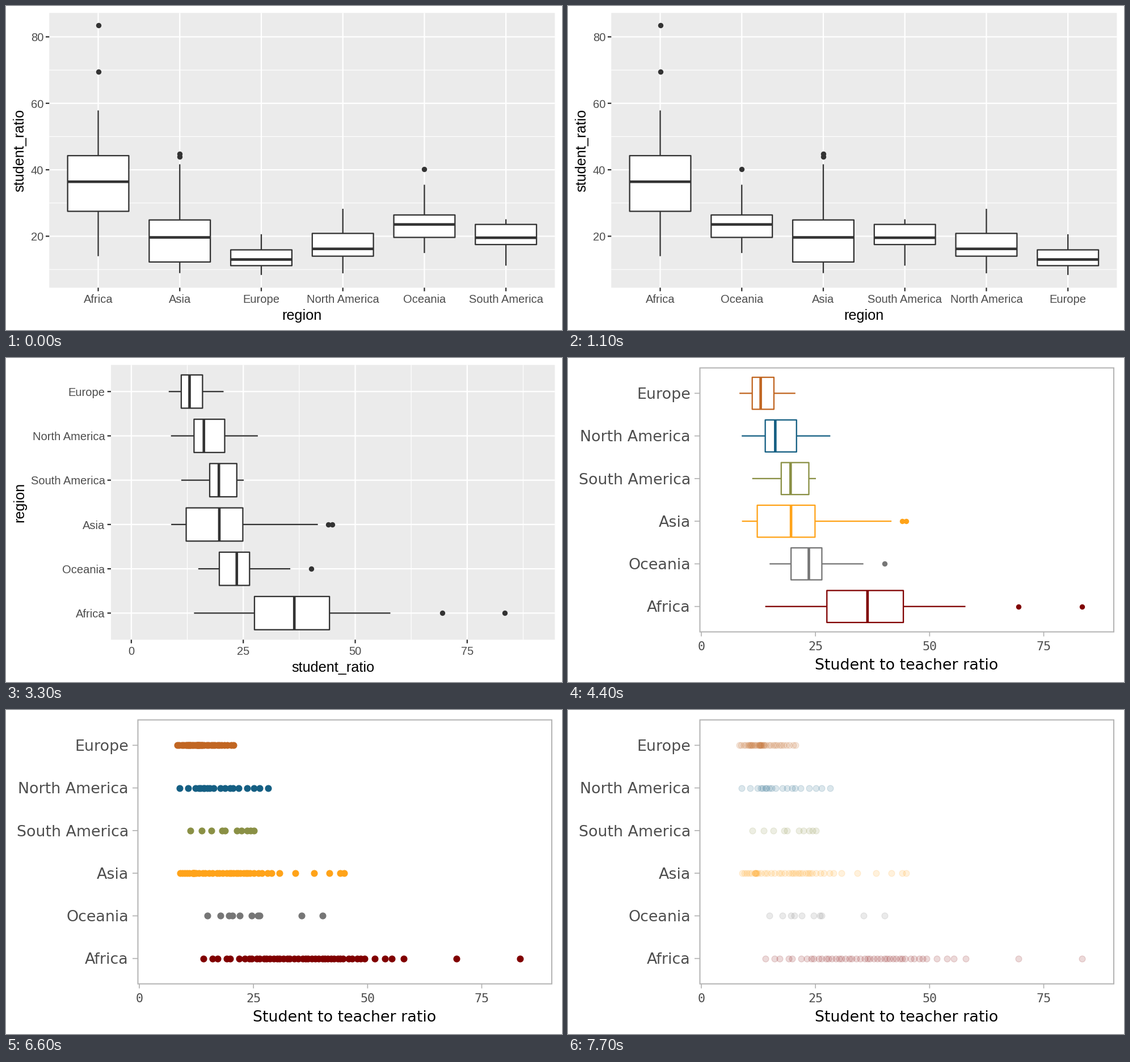
Recreate the animation shown at these times as a matplotlib script. Size 980x572 px, loop 8000 ms.

```python
import numpy as np
import matplotlib.pyplot as plt
from matplotlib.animation import FuncAnimation
from matplotlib.patches import Polygon, Rectangle

W, H, DPI = 980, 572, 100
PX = 72 / DPI            # points per pixel
STEP, LOOP, HOLD = 100, 8000, 1100
DARK, TEXT, PANEL, RULE = "#333333", "#4D4D4D", "#EBEBEB", "#B3B3B3"
plt.rcParams["path.snap"] = False
rng = np.random.default_rng(4)


class Region:
    """Octiles (the last one is the whisker end), outliers and country count."""

    def __init__(self, color, count, octiles, outliers=()):
        self.color, self.outliers = color, outliers
        self.box = octiles[::2]
        body = count - len(outliers)
        end = (body - 1) / (count - 1)
        rank = np.linspace(0, end, body)
        rank[1:-1] += rng.uniform(-0.3, 0.3, body - 2) / (count - 1)
        knots = np.append(np.arange(8) / 8, end)
        self.values = np.append(np.interp(rank, knots, octiles), outliers)


REGIONS = {
    "Africa": Region("#800000", 47, (14, 23, 27.5, 31.6, 36.4, 40.5, 44.25, 49.7, 57.85),
                     (69.5, 83.4)),
    "Asia": Region("#FFA319", 41, (8.9, 11.6, 12.25, 16.1, 19.65, 22.2, 24.9, 30.3, 41.65),
                   (44, 44.8)),
    "Europe": Region("#C16622", 35, (8.35, 10.3, 11.15, 12.5, 13, 13.9, 15.9, 17.95, 20.6)),
    "North America": Region("#155F83", 19, (8.85, 12.4, 14, 14.5, 16.2, 19.2, 20.85, 24.7, 28.25)),
    "Oceania": Region("#767676", 10, (14.95, 17.6, 19.65, 20.5, 23.55, 25.6, 26.4, 34.4, 35.5),
                      (40.15,)),
    "South America": Region("#8A9045", 10, (11.15, 13.5, 17.5, 18.15, 19.55, 22.15, 23.55, 24.05, 25.1)),
}
BY_NAME = list(REGIONS)
BY_RATIO = sorted(REGIONS, key=lambda k: -REGIONS[k].box[2])

fig = plt.figure(figsize=(W / DPI, H / DPI), dpi=DPI, facecolor="white")


def new_scene():
    ax = fig.add_axes([0, 0, 1, 1])
    ax.set(xlim=(0, W), ylim=(H, 0))
    ax.axis("off")
    return ax


def line(ax, a, b, color, width, z=2):
    ax.plot(*zip(a, b), color=color, lw=width * PX, solid_capstyle="butt", zorder=z)


def label(ax, x, y, s, size, color=TEXT, ha="center", font="Liberation Sans", rot=0):
    ax.text(x, y, s, fontsize=size * PX, color=color, ha=ha, va="baseline",
            family=font, rotation=rot, rotation_mode="anchor")


def dots(ax, pts, diameter, color, edge=0, alpha=1):
    if len(pts):
        x, y = zip(*pts)
        ax.scatter(x, y, s=(diameter * PX) ** 2, color=color, alpha=alpha,
                   lw=edge * PX, zorder=4)


def boxplot(ax, at, region, pos, half, color, width):
    """Draw one box; `at` maps (value, position) to pixels."""
    lo, q1, med, q3, hi = region.box
    dots(ax, [at(v, pos) for v in region.outliers], 9.4, color)
    line(ax, at(lo, pos), at(q1, pos), color, width, 3)
    line(ax, at(q3, pos), at(hi, pos), color, width, 3)
    corners = [at(q1, pos - half), at(q3, pos - half),
               at(q3, pos + half), at(q1, pos + half)]
    ax.add_patch(Polygon(corners, fc="white", ec=color, lw=width * PX,
                         joinstyle="round", zorder=3))
    line(ax, at(med, pos - half), at(med, pos + half), color, 2 * width, 4)


def grey_scene(order, flip, left, zero, scale, major, minor):
    """Default grey look; `flip` puts the values on the x axis."""
    ax = new_scene()
    right, top, bottom = 967.4, 12.3, 497.3
    ax.add_patch(Rectangle((left, top), right - left, bottom - top, fc=PANEL, lw=0))

    def at(v, p):
        return (zero + scale * v, p) if flip else (p, zero - scale * v)

    def across(p, vertical, width):
        ends = ((p, top), (p, bottom)) if vertical else ((left, p), (right, p))
        line(ax, *ends, "white", width)

    def tick(p, vertical, text):
        if vertical:
            line(ax, (p, bottom), (p, bottom + 6.3), DARK, 2.3)
            label(ax, p, 524, text, 20.2)
        else:
            line(ax, (left - 6.3, p), (left, p), DARK, 2.3)
            label(ax, left - 10.3, p + 7.8, text, 20.2, ha="right")

    step = (bottom - top if flip else right - left) / 6.2
    for v in minor:
        across(at(v, 0)[not flip], flip, 1.2)
    for v in major:
        p = at(v, 0)[not flip]
        across(p, flip, 2.3)
        tick(p, flip, str(v))
    for i, name in enumerate(order):
        p = bottom - step * (0.6 + i) if flip else left + step * (0.6 + i)
        across(p, not flip, 2.3)
        tick(p, not flip, name)
        boxplot(ax, at, REGIONS[name], p, 0.375 * step, DARK, 2.3)

    below, beside = ("student_ratio", "region") if flip else ("region", "student_ratio")
    label(ax, (left + right) / 2, 554.3, below, 25.2, "black")
    label(ax, 31.3, (top + bottom) / 2, beside, 25.2, "black", rot=90)
    return ax


ROW0, ROW = 438.7, 75.28


def spot(v, p):
    return 235 + 8.047 * v, p


def density(values):
    grid = np.linspace(values.min(), values.max(), 300)
    spread = np.subtract(*np.percentile(values, [75, 25])) / 1.34
    bw = 0.9 * min(values.std(ddof=1), spread) * len(values) ** -0.2
    z = (grid[:, None] - values) / bw
    return grid, np.exp(-z * z / 2).mean(axis=1) / (bw * np.sqrt(2 * np.pi))


CURVES = {name: density(r.values) for name, r in REGIONS.items()}
PEAK = max(d.max() for _, d in CURVES.values())


def light_scene(kind):
    """White look with one coloured row per region."""
    ax = new_scene()
    ax.add_patch(Rectangle((232.5, 17.5), 729.5, 466, fc="white", ec=RULE, lw=2 * PX))
    for v in (0, 25, 50, 75):
        x = spot(v, 0)[0]
        line(ax, (x, 484), (x, 491.5), RULE, 1.7)
        label(ax, x, 516, str(v), 21.6, font="DejaVu Sans Mono")
    label(ax, 596.7, 549.5, "Student to teacher ratio", 26.85, "black", font="DejaVu Sans")

    for i, name in enumerate(BY_RATIO):
        y = ROW0 - ROW * i
        region = REGIONS[name]
        line(ax, (223, y), (232, y), RULE, 1.7)
        label(ax, 216, y + 9.8, name, 26.85, ha="right", font="DejaVu Sans")
        if kind == "box":
            boxplot(ax, spot, region, y, 0.375 * ROW, region.color, 2.3)
        elif kind == "violin":
            grid, d = CURVES[name]
            h = 0.45 * ROW * d / PEAK
            x = spot(grid, 0)[0]
            outline = np.column_stack([np.r_[x, x[::-1]], np.r_[y - h, (y + h)[::-1]]])
            ax.add_patch(Polygon(outline, fc="none", ec=region.color, lw=2.3 * PX,
                                 joinstyle="round"))
        else:
            alpha = 0.15 if kind == "faint" else 1
            dots(ax, [spot(v, y) for v in region.values], 10.8, region.color, 1.3, alpha)
    return ax


tens = dict(major=range(20, 81, 20), minor=range(10, 71, 20))
upright = dict(flip=False, left=76.3, zero=523.8, scale=5.867, **tens)
scenes = [
    grey_scene(BY_NAME, **upright),
    grey_scene(BY_RATIO, **upright),
    grey_scene(BY_RATIO, True, 185, 142.1, 9.463, **tens),
    grey_scene(BY_RATIO, True, 185, 220.9, 7.893,
               range(0, 76, 25), np.arange(12.5, 90, 25)),
    light_scene("box"),
    light_scene("violin"),
    light_scene("solid"),
    light_scene("faint"),
]


def update(frame):
    current = frame * STEP // HOLD
    for i, ax in enumerate(scenes):
        ax.set_visible(i == current)
    return scenes


anim = FuncAnimation(fig, update, frames=LOOP // STEP, interval=STEP,
                     init_func=lambda: update(0), repeat=True, repeat_delay=0)
plt.show()
```
